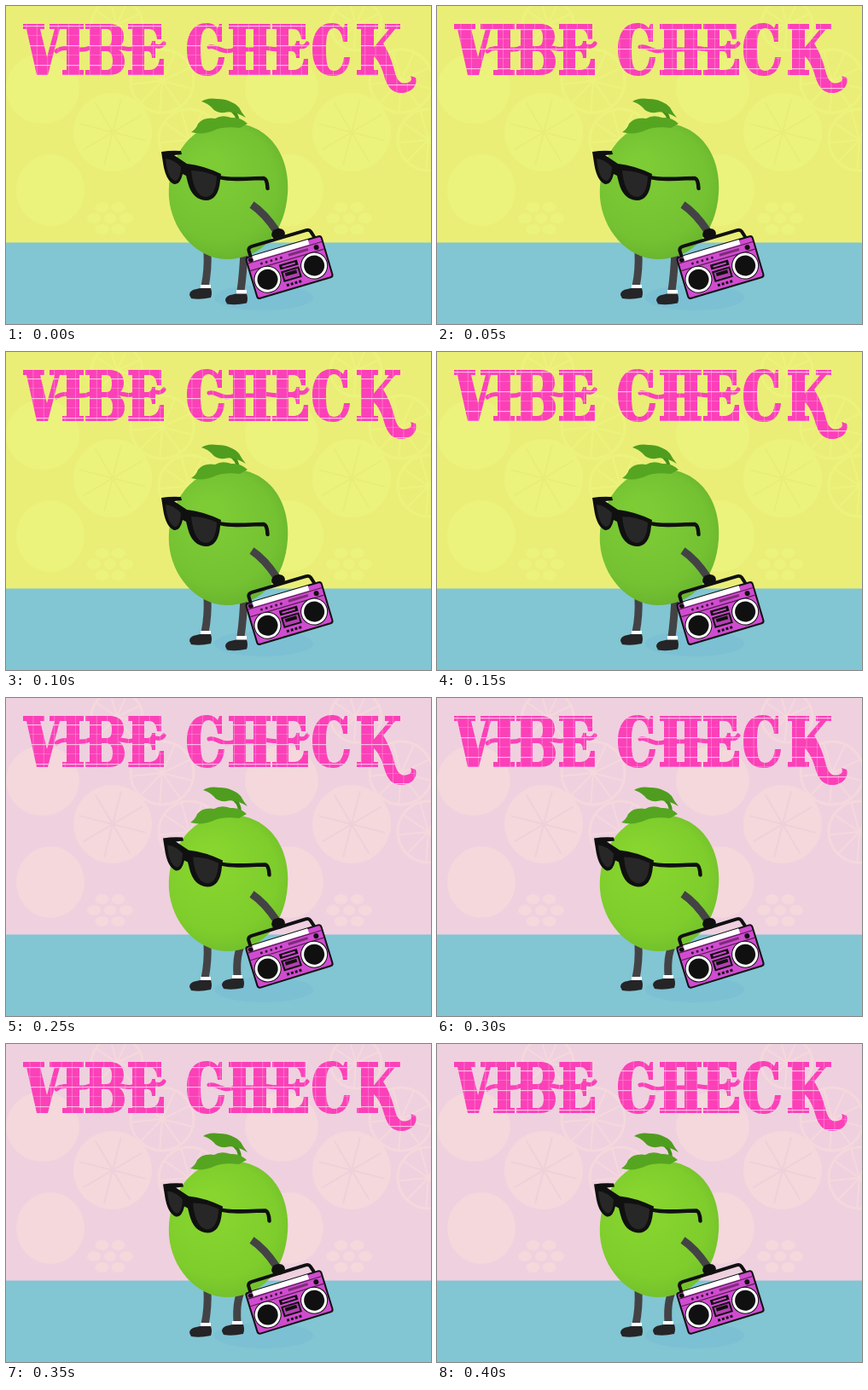
An HTML page with a canvas that plays this animation: 498 px wide and 373 px high, repeating every 450 ms.

```html
<!DOCTYPE html>
<html lang="en">
<head>
<meta charset="utf-8">
<title>Vibe Check</title>
<style>
html, body { margin: 0; width: 100%; height: 100%; overflow: hidden; background: #82c5d3; }
canvas { display: block; }
</style>
</head>
<body>
<canvas id="stage" width="498" height="373" role="img" aria-label="VIBE CHECK">VIBE CHECK</canvas>
<script>
const W = 498, H = 373, STEP = 50, STEPS = 9, TAU = Math.PI * 2;
const stage = document.getElementById('stage').getContext('2d');
const titleLayer = document.createElement('canvas');
titleLayer.width = W;
titleLayer.height = H;
const title = titleLayer.getContext('2d');
let c = stage;

const INK = '#101010', LIMB = '#434345';
const YELLOW = { wall: '#eaee77', fruit: '#ecf37d', line: '#e8ed78', lime: ['#7dcb35', '#74c232', '#66b12d'] };
const PINK = { wall: '#efd0df', fruit: '#f4d8dc', line: '#efd0da', lime: ['#88d52f', '#7ecd2c', '#70bd2b'] };

function fill(d, color, rule = 'nonzero') {
  c.fillStyle = color;
  c.fill(new Path2D(d), rule);
}

function line(d, width, color, cap = 'butt') {
  c.lineWidth = width;
  c.strokeStyle = color;
  c.lineCap = cap;
  c.lineJoin = 'round';
  c.stroke(new Path2D(d));
}

function oval(x, y, rx, ry, color, angle = 0) {
  c.fillStyle = color;
  c.beginPath();
  c.ellipse(x, y, rx, ry, angle, 0, TAU);
  c.fill();
}

function box(x, y, w, h, color) {
  c.fillStyle = color;
  c.fillRect(x, y, w, h);
}

function shifted(x, y, draw) {
  c.save();
  c.translate(x, y);
  draw();
  c.restore();
}

// Background

function spokes(x, y, r, count, width, color) {
  for (let i = 0; i < count; i++) {
    const a = 0.25 + i * TAU / count;
    line(`M${x} ${y}L${x + r * Math.cos(a)} ${y + r * Math.sin(a)}`, width, color);
  }
}

function wheel(x, y, r, color) {
  c.lineWidth = 3;
  c.strokeStyle = color;
  c.beginPath();
  c.arc(x, y, r, 0, TAU);
  c.stroke();
  spokes(x, y, r, 9, 2, color);
}

function fruitTile(p) {
  wheel(183, 88, 37, p.fruit);
  wheel(215, 157, 36, p.fruit);
  wheel(130, 22, 30, p.fruit);
  oval(43, 97, 43, 41, p.fruit);
  oval(52, 216, 40, 42, p.fruit);
  oval(125, 148, 46, 46, p.fruit);
  spokes(125, 148, 40, 8, 2, p.line);
  oval(122, 249, 7, 6, p.fruit);
  for (let i = 0; i < 6; i++) {
    const a = i * TAU / 6;
    oval(122 + 19 * Math.cos(a), 249 + 15 * Math.sin(a), 8, 6, p.fruit);
  }
}

function room(p) {
  box(0, 0, W, H, p.wall);
  for (const x of [-280, 0, 280]) shifted(x, 0, () => fruitTile(p));
  box(0, 277.5, W, H, '#82c5d3');
  oval(302, 342, 58, 15, 'rgba(100,175,210,.22)');
}

// Lettering

const LETTERS = {
  V: 'M20 21H45V27H40L48 60 57 27H51V21H67V27H63L49 81H36L24 27H20Z',
  I: 'M66 21H91V27H86V75H91V81H66V75H71V27H66Z',
  B: 'M93 21H120C134 21 138 28 138 36C138 44 134 48 129 50C136 52 139 58 139 65C139 75 133 81 120 81H93V75H98V27H93Z'
    + 'M112 27V47H118C122 47 124 44 124 37C124 30 122 27 118 27Z'
    + 'M112 53V75H118C123 75 125 71 125 64C125 57 122 53 118 53Z',
  E: 'M143 21H182V39H177C176 31 173 27 168 27H162V47H166C169 47 171 44 171 41H175V61H171C171 56 169 53 166 53'
    + 'H162V75H168C175 75 179 70 180 62H185V81H143V75H148V27H143Z',
  C: 'M253 21V42H248C247 32 243 26 237 26C230 26 228 34 228 51C228 68 230 76 237 76C244 76 248 70 249 60H256'
    + 'C255 74 248 82 236 82C220 82 212 70 212 51C212 32 220 20 235 20C241 20 245 22 248 26L250 21Z',
  leg: 'M429 51L449 27H444V21H462V27H456L442 44C449 55 453 67 456 79C459 89 464 92 470 90C475 89 476 86 474 82'
    + 'L480 84C483 94 474 102 463 102C452 102 447 94 444 85C441 74 437 64 430 58Z'
};
const WORDS = [['V', 0], ['I', 0], ['B', 0], ['E', 0], ['C', 0], ['I', 195], ['I', 219],
  ['E', 169], ['C', 147], ['I', 345], ['leg', 0]];
const SWASHES = 'M59 53C70 44 84 56 98 49M128 50C136 46 142 54 150 49M171 49C175 43 179 52 185 44'
  + 'M238 48C246 45 252 57 268 51H292C304 46 312 53 322 50M340 50C344 44 348 52 353 44';

function heading(phase) {
  const pink = '#fc40b8';
  c = title;
  c.globalCompositeOperation = 'source-over';
  c.clearRect(0, 0, W, H);
  for (const [name, x] of WORDS) shifted(x, 0, () => fill(LETTERS[name], pink, 'evenodd'));
  line(SWASHES, 5, pink, 'round');

  // The woven check slides through the letters: bold and faint rows, faint columns.
  c.globalCompositeOperation = 'source-atop';
  const tint = alpha => `rgba(255,225,242,${alpha})`;
  const shift = phase * 4;
  for (let y = 23 + shift; y < 110; y += 23) {
    box(0, y, W, 1.2, tint(0.75));
    box(0, y + 11, W, 1, tint(0.25));
  }
  for (let x = 11 + shift; x < W; x += 12.4) box(x, 0, 1, 110, tint(0.3));
  c = stage;
  c.drawImage(titleLayer, 0, 0);
}

// Character

function shoe(x, y) {
  fill(`M${x} ${y + 8}C${x} ${y + 1} ${x + 9} ${y + 1} ${x + 13} ${y}H${x + 25}Q${x + 27} ${y + 6} ${x + 25} ${y + 11}`
    + `Q${x + 12} ${y + 14} ${x + 2} ${y + 12}Z`, '#252426');
}

function legs(up) {
  line('M236 289Q237 309 233 329', 9, LIMB);
  box(228, 327, 12, 5, '#fff');
  shoe(215, 331);
  if (up) {
    line('M279 284Q269 298 271 326', 9, LIMB);
    box(265, 325, 12, 5, '#fff');
    shoe(253, 329);
  } else {
    line('M279 287Q278 313 275 334', 9, LIMB);
    box(270, 333, 12, 5, '#fff');
    shoe(257, 337.5);
  }
}

function body(p) {
  const skin = c.createRadialGradient(238, 188, 15, 255, 215, 90);
  p.lime.forEach((color, i) => skin.addColorStop([0, 0.7, 1][i], color));
  fill('M191 225C188 180 215 137 262 137C308 137 333 175 330 220C327 265 300 297 258 297C222 296 194 262 191 225Z', skin);
}

function leaves(up) {
  shifted(up ? 2 : 0, up ? -4 : 0, () => {
    line('M262 121Q272 126 272 138', 4, '#43901d');
    fill('M229 112Q236 107 248 109C259 109 269 114 273 119Q276 125 281 131Q266 122 256 125Q246 126 241 119Q236 114 229 112Z', '#4f9d1f');
  });
  shifted(up ? -1 : 0, up ? -2 : 0, () => {
    fill('M217 148Q223 144 225 138Q232 130 245 132Q253 127 264 131Q275 130 283 138L274 143Q256 141 246 145Q231 152 217 148Z', '#55a521');
  });
}

function glasses(up) {
  shifted(up ? 2 : 0, up ? -6.5 : 0, () => {
    line('M247 200C260 205 284 202 302 202Q306 203 306.5 214', 4.5, INK, 'round');
    fill('M182 171Q194 169 205 170L206 174L197 175L212 185Q231 187 252 197L251 204Q249 228 234 228Q218 227 213 207'
      + 'L211 199L207 197Q204 210 197 209Q187 205 184 184Z', INK);
    fill('M187 179Q197 180 205 189Q204 205 198 205Q189 202 187 179Z', '#272727');
    fill('M217 193Q233 193 247 200Q246 223 234 224Q220 223 217 193Z', '#272727');
  });
}

function boombox(up) {
  c.save();
  c.translate(332, up ? 303 : 306.5);
  c.rotate(up ? -0.3 : -0.288);
  line('M-40 -26L-40 -33Q-39 -36 -35 -36H31Q35 -36 36 -33L38 -26', 4, INK, 'round');
  c.fillStyle = '#d04bd0';
  c.strokeStyle = INK;
  c.lineWidth = 2;
  c.beginPath();
  c.roundRect(-46, -25, 92, 50, 3);
  c.fill();
  c.stroke();
  box(-38, -25, 68, 6, '#fff');
  line('M-45 -18H45M-45 -9H45', 1.2, '#54204f');
  oval(-41, -21, 3, 2.5, INK);
  for (let x = -30; x <= -6; x += 6) oval(x, -13.5, 1.5, 1.5, '#361434');
  box(3, -15.5, 24, 3, '#7d2c78');
  oval(37, -13.5, 3, 3, INK);
  for (const x of [-28.5, 28.5]) {
    oval(x, 6.4, 16, 16, INK);
    oval(x, 6.4, 15, 15, '#fff');
    oval(x, 6.4, 12, 12, INK);
  }
  box(-11, -6, 22, 6, INK);
  box(-8, -4, 16, 2, '#d04bd0');
  box(-11, 2, 22, 13, INK);
  box(-9, 4, 18, 9, '#b43fb2');
  box(-7, 5, 14, 4, INK);
  for (let x = -9; x < 9; x += 5) box(x, 18, 3, 3, INK);
  c.restore();
}

function arm(up) {
  shifted(0, up ? -3 : 0, () => {
    line('M288 233Q303 243 317 264', 9, LIMB);
    oval(319, 267.5, 8, 6.5, INK, -0.2);
  });
}

function draw(now) {
  const step = Math.floor(now / STEP) % STEPS;
  const up = step >= 5;
  const palette = up ? PINK : YELLOW;
  room(palette);
  heading(step % 3);
  legs(up);
  body(palette);
  leaves(up);
  glasses(up);
  boombox(up);
  arm(up);
}

let start;
function tick(now) {
  start ??= now;
  draw(now - start);
  requestAnimationFrame(tick);
}
draw(0);
requestAnimationFrame(tick);
</script>
</body>
</html>
```
